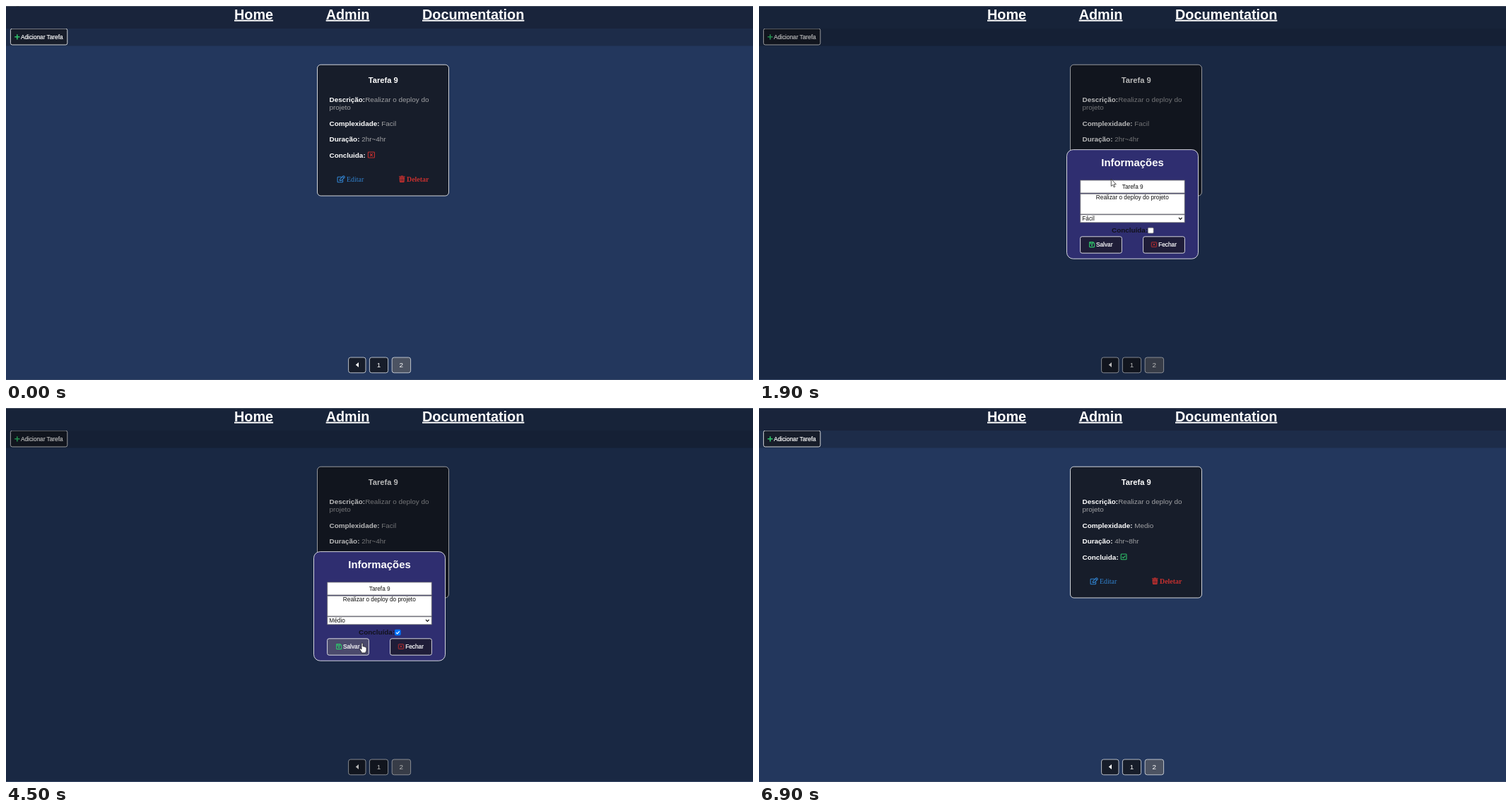
An HTML page for the animation above (7.1 s loop, 1057 by 530 pixels).

```html
<!DOCTYPE html>
<html lang="pt">
<head>
<meta charset="utf-8">
<title>Tarefas</title>
<style>
  html, body { margin: 0; width: 100%; height: 100%; overflow: hidden; background: #23375d; }
  svg { display: block; width: 1057px; height: 530px; }
  text { font-family: "Liberation Sans", Arial, sans-serif; font-size: 9.92px; fill: #fff; }
  .nav { font-size: 19.84px; font-weight: bold; text-decoration: underline; }
  .small { font-size: 8.27px; }
  .btn { stroke: #fff; stroke-width: .2px; }
  .serif { font-family: "Liberation Serif", "Times New Roman", serif; }
  .b { font-weight: bold; fill: #fff; }
  .mid { text-anchor: middle; }
  .val { fill: #a0a1a4; }
  .ink { fill: #111; }
  .line { fill: none; stroke: currentColor; stroke-width: 1.1; }
</style>
</head>
<body>
<svg id="stage" viewBox="0 0 1057 530" xmlns="http://www.w3.org/2000/svg"></svg>
<script>
const GREEN = '#2fc26a', RED = '#c5302f', BLUE = '#3182ce';

const box = (x, y, w, h, r, fill, stroke, extra = '') =>
  `<rect x="${x}" y="${y}" width="${w}" height="${h}" rx="${r}" fill="${fill}" stroke="${stroke}" stroke-width=".8" ${extra}/>`;
const text = (x, y, cls, str, extra = '') =>
  `<text x="${x}" y="${y}" class="${cls}" ${extra}>${str}</text>`;
const icon = (x, y, color, body, scale = 1) =>
  `<g transform="translate(${x} ${y}) scale(${scale})" style="color:${color}">${body}</g>`;
const row = (y, label, value, id) =>
  text(457.5, y, 'val', `<tspan class="b">${label}</tspan> <tspan id="${id}">${value}</tspan>`);

const crossBox = '<rect x=".6" y=".6" width="9" height="8" rx=".8" class="line"/><path d="M3.3 2.8L6.9 6.4M6.9 2.8L3.3 6.4" class="line"/>';
const checkBox = '<rect x=".6" y=".6" width="7.8" height="7.8" rx=".9" class="line"/><path d="M2.2 4.4L3.9 6.1L6.9 3" class="line"/>';
const disk = '<path d="M.6 1.2Q.6 .6 1.2 .6H5.8L7.6 2.4V7Q7.6 7.6 7 7.6H1.2Q.6 7.6 .6 7ZM2.2 .6V2.9H5.3V.6" class="line"/><circle cx="4.1" cy="5.2" r="1.1" fill="currentColor"/>';
const pencil = '<path d="M6.4 2H1.4Q.6 2 .6 2.8V8.7Q.6 9.5 1.4 9.5H7.3Q8.1 9.5 8.1 8.7V6.2" class="line"/><path d="M3.8 7.2L4 5.3L8.6 .7Q9.1 .3 9.6 .7L10.6 1.7Q11 2.2 10.6 2.7L6 7.2ZM7.7 1.7L9.6 3.6" class="line"/>';
const trash = '<path d="M0 1H2.5L3 .2H5.6L6.1 1H8.6V2H0ZM.6 2.6H8L7.6 9Q7.5 9.8 6.7 9.8H1.9Q1.1 9.8 1 9Z" fill="currentColor"/><path d="M2.6 4V8.4M4.3 4V8.4M6 4V8.4" stroke="#171d2a" stroke-width=".6"/>';

const levels = ['Fácil', 'Médio', 'Difícil'];
const optionY = i => 307.8 + i * 11;

const page = `
  <rect width="1057" height="530" fill="#23375d"/>
  <rect y="32" width="1057" height="24.5" fill="#1d2c49"/>
  ${box(6.4, 32, 80.4, 23, 2.5, '#171d2a', '#fff')}
  <path d="M12.2 43.8H19.4M15.8 40.2V47.4" stroke="${GREEN}" stroke-width="1.6"/>
  ${text(21, 46.8, 'small btn', 'Adicionar Tarefa')}
  ${box(440.5, 83.2, 186, 185.8, 5, '#171d2a', '#fff')}
  ${text(533.8, 109, 'b mid', 'Tarefa 9', 'style="font-size:11.16px"')}
  <text x="457.5" y="136" class="val"><tspan class="b">Descrição:</tspan>Realizar o deploy do<tspan x="457.5" y="147.3">projeto</tspan></text>
  ${row(170, 'Complexidade:', 'Facil', 'level')}
  ${row(192.3, 'Duração:', '2hr~4hr', 'span')}
  ${text(457.5, 214.6, 'b', 'Concluida:')}
  <g id="open">${icon(511.8, 206.4, RED, crossBox)}</g>
  <g id="done">${icon(511.6, 206.4, GREEN, checkBox)}</g>
  <g id="edit">${icon(468.5, 240.2, 'inherit', pencil)}${text(482, 249, 'serif', 'Editar', 'style="fill:currentColor"')}</g>
  ${icon(556, 240.2, RED, trash)}
  ${text(567, 249, 'serif', 'Deletar', `style="fill:${RED};font-weight:bold"`)}
  ${box(484.6, 498, 24.4, 21.8, 3, '#171d2a', '#dfe2e8')}
  ${box(514.4, 498, 26.2, 21.8, 3, '#171d2a', '#dfe2e8')}
  ${box(546.2, 498, 26.4, 21.8, 3, '#4c5362', '#dfe2e8')}
  <path d="M499 505V512L494.8 508.5Z" fill="#fff"/>
  ${text(527.5, 512.3, 'mid', '1')}${text(559.3, 512.3, 'mid', '2')}`;

const modal = `
  ${box(435.5, 203.6, 186, 154.6, 9, '#2f2e70', '#fff')}
  ${text(528.5, 226.6, 'b mid', 'Informações', 'style="font-size:14.88px"')}
  ${box(454.8, 247, 147.4, 18, 0, '#fff', '#767676')}
  ${text(528.7, 259, 'small ink mid', 'Tarefa 9')}
  ${box(454.8, 266.2, 147.4, 28.8, 0, '#fff', '#767676')}
  ${text(528.3, 274.4, 'small ink mid', 'Realizar o deploy do projeto')}
  ${box(454.8, 295.8, 147.4, 11, 0, '#fff', '#767676', 'id="select"')}
  ${text(457.3, 304.3, 'small ink', '', 'id="choice"')}
  <path d="M594 300L596.3 302.3L598.6 300" fill="none" stroke="#111" stroke-width="1.2"/>
  ${text(499, 321, 'b', 'Concluída:', 'style="fill:#12121c"')}
  ${box(550.4, 314.2, 7.8, 7.8, 1.2, '#fff', '#767676', 'id="tick"')}
  <path id="tickMark" d="M552 318.2L553.7 319.9L556.7 316.3" fill="none" stroke="#fff" stroke-width="1.2"/>
  ${box(454.6, 326.8, 58.8, 23.4, 2.5, '#1f1d38', '#fff', 'id="save"')}
  ${icon(467, 334, GREEN, disk)}${text(477, 341, 'small btn', 'Salvar')}
  ${box(543.6, 326.8, 58.8, 23.4, 2.5, '#1f1d38', '#fff')}
  ${icon(554.8, 334.3, RED, crossBox, .82)}${text(565.2, 341, 'small btn', 'Fechar')}
  <g id="list">
    ${box(454.8, 307.3, 147.4, 34, 0, '#fff', '#767676')}
    <rect id="mark" x="455.2" width="146.6" height="11" fill="#1967d2"/>
    ${levels.map((s, i) => text(457.3, optionY(i) + 8.4, 'small', s, `id="option${i}"`)).join('')}
  </g>`;

const pointers = `
  <g id="pointer" fill="#fff" stroke="#111" stroke-width=".7" stroke-linejoin="round">
    <path id="arrow" d="M.3 .3V10.4L2.6 8.3L4.2 11.8L5.8 11.1L4.2 7.7H7.3Z"/>
    <path id="hand" d="M-1 1Q-1 0 0 0T1 1V5Q2 4.3 2.7 5.3Q3.8 4.8 4.4 5.8Q6 5.5 6 7V10Q6 11.5 5 12.8V14H-1V12.8L-3.6 9Q-4.1 7.7 -3 7.5Q-2 7.5 -1 9Z"/>
    <path id="beam" d="M-2 -5H2M0 -5V5M-2 5H2" fill="none"/>
  </g>`;

document.getElementById('stage').innerHTML = `
  ${page}
  <rect id="shade" y="32" width="1057" height="497" fill="#000" fill-opacity=".28"/>
  <rect id="bar" width="1057" height="32"/>
  ${text(323, 18.7, 'nav', 'Home')}${text(452.7, 18.7, 'nav', 'Admin')}${text(589, 18.7, 'nav', 'Documentation')}
  <rect width="1057" height="1" fill="#475060"/>
  <rect y="529" width="1057" height="1" fill="#3a4a68"/>
  <g id="modal">${modal}</g>
  ${pointers}`;

const el = {};
document.querySelectorAll('[id]').forEach(n => el[n.id] = n);
const show = (n, on) => n.setAttribute('display', on ? 'inline' : 'none');
const fill = (n, color) => n.setAttribute('fill', color);

// Pointer samples: time, x, y; each is held until the next.
const track = [
  [0, 12, -11], [100, 175, 70], [200, 425, 180], [300, 507, 221],
  [1000, 530, 215], [1100, 562, 209], [1200, 520, 212], [1300, 448, 215],
  [1400, 403, 226], [1500, 455, 241], [1600, 499, 244],
  [1900, 498, 245], [2100, 505, 258], [2200, 518, 274], [2300, 532, 290],
  [2400, 545, 303], [2500, 552, 312], [2600, 554, 316],
  [3200, 555, 308], [3300, 556, 305], [3500, 557, 306],
  [3800, 547, 315], [3900, 540, 322], [4300, 525, 328], [4400, 510, 331], [4500, 504, 333],
  [6100, 540, 322], [6200, 605, 292], [6300, 658, 235], [6400, 634, 160],
  [6500, 490, 78], [6600, 300, 42], [6700, 150, 14], [6800, 56, -11.5], [6900, -30, -30]
];
const LOOP = 7100;

function draw(t) {
  const [, x, y] = track.findLast(k => k[0] <= t);
  const within = (l, top, r, b) => x >= l && x <= r && y >= top && y <= b;
  const editing = t >= 1900 && t < 4800;
  const listOpen = t >= 3700 && t < 4200;
  const saved = t >= 4800;
  const ticked = t >= 3100;

  show(el.shade, editing);
  show(el.modal, editing);
  fill(el.bar, editing ? '#172339' : '#19243b');
  el.level.textContent = saved ? 'Medio' : 'Facil';
  el.span.textContent = saved ? '4hr~8hr' : '2hr~4hr';
  show(el.open, !saved);
  show(el.done, saved);

  const overEdit = !editing && within(468, 240, 508, 251);
  const overSave = editing && within(454, 327, 514, 350);
  const overField = editing && within(455, 247, 602, 295);
  el.edit.style.color = overEdit ? '#fff' : BLUE;
  fill(el.save, overSave ? '#4b4a6c' : '#1f1d38');
  el.select.setAttribute('stroke', within(455, 295, 602, 307) ? '#333' : '#767676');

  el.choice.textContent = levels[t >= 4200 ? 1 : 0];
  fill(el.tick, ticked ? '#0075ff' : '#fff');
  el.tick.setAttribute('stroke', ticked ? '#0075ff' : '#767676');
  show(el.tickMark, ticked);

  show(el.list, listOpen);
  const active = t >= 3800 && y > 318 ? 1 : 0;
  el.mark.setAttribute('y', optionY(active));
  levels.forEach((_, i) => el['option' + i].style.fill = i === active ? '#fff' : '#111');

  const hand = overEdit || overSave;
  show(el.hand, hand);
  show(el.beam, overField);
  show(el.arrow, !hand && !overField);
  el.pointer.setAttribute('transform', `translate(${x} ${y})`);
}

const start = performance.now();
function tick() {
  draw((performance.now() - start) % LOOP);
  requestAnimationFrame(tick);
}
tick();
</script>
</body>
</html>
```
